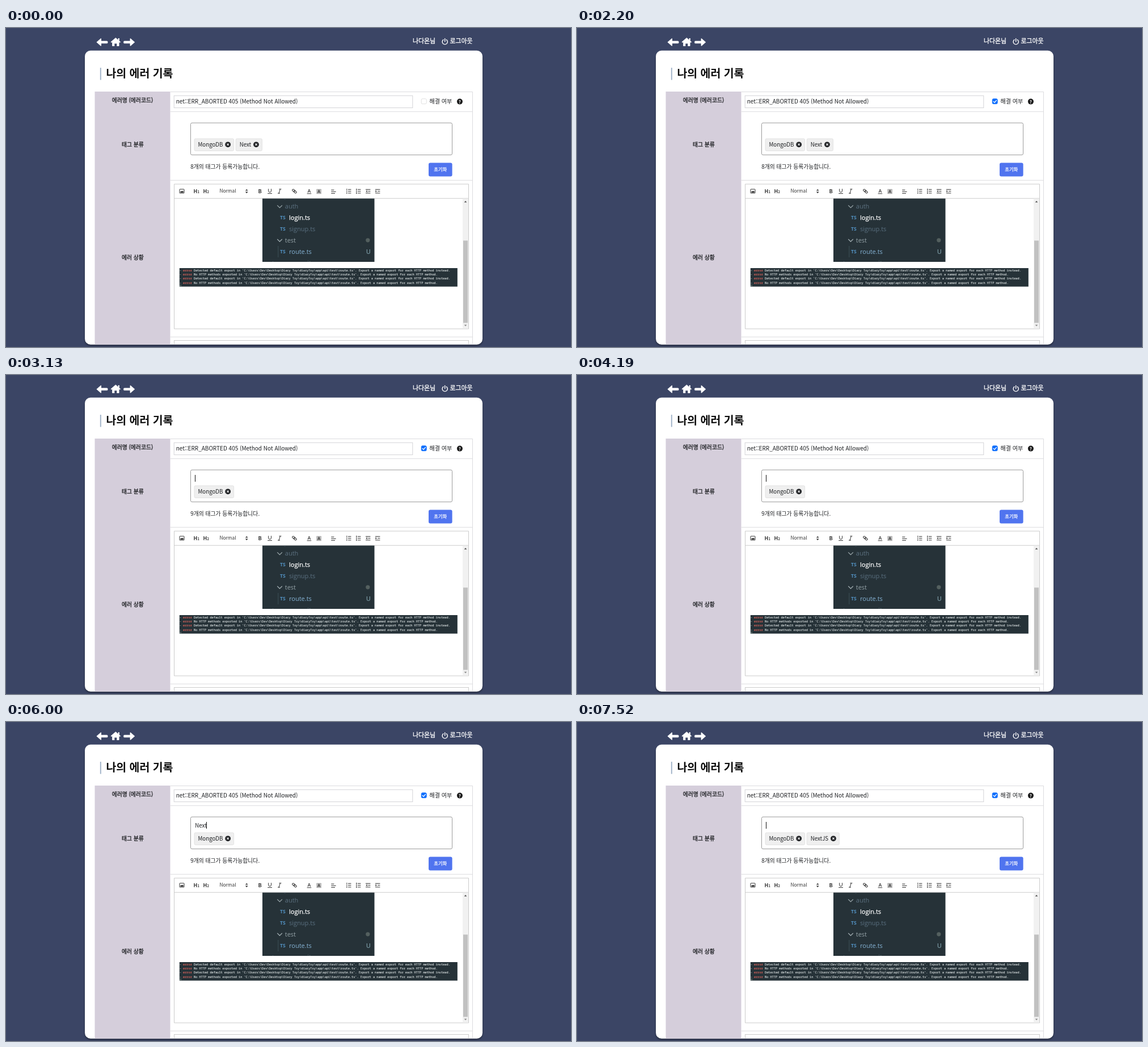
Recreate the animation shown at these times as an HTML page. Size 996 by 562 pixels, loop 8000 ms.

```html
<!DOCTYPE html>
<html lang="ko">
<head>
<meta charset="utf-8">
<title>나의 에러 기록</title>
<style>
  html, body { margin: 0; width: 100%; height: 100%; overflow: hidden; background: #3b4565; }
  svg { display: block; width: 996px; height: 562px; }
  text { font-family: "Noto Sans CJK KR", "Noto Sans CJK", "Noto Sans CJK JP", "Noto Sans", sans-serif; font-size: 9.8px; fill: #1c1e21; white-space: pre; }
  .mid { stroke: #1c1e21; stroke-width: .3; text-anchor: middle; }
  .head { font-size: 10.9px; fill: #fff; stroke: #fff; stroke-width: .3; }
  .title { font-size: 19.4px; font-weight: 700; fill: #0c0c0c; }
  .tree text { font-family: "Open Sans", "Noto Sans", sans-serif; font-size: 11px; }
  .tree .ts { font-size: 8.6px; font-weight: 700; fill: #5290c0; }
  .log text { font-family: "Noto Sans Mono", monospace; font-size: 5.27px; fill: #dfe5e5; stroke: #dfe5e5; stroke-width: .1; }
  .log .err { fill: #ef6a60; stroke: #ef6a60; }
  .icons { fill: none; stroke: #333; stroke-width: 1; }
  .icons text { stroke: none; fill: #333; }
  .line { fill: none; stroke: #dcdcdf; }
</style>
</head>
<body>
<svg viewBox="0 0 996 562" xmlns="http://www.w3.org/2000/svg">
  <defs>
    <filter id="soft" x="-5%" y="-5%" width="110%" height="110%"><feGaussianBlur stdDeviation="1.5"/></filter>
    <clipPath id="panel"><rect x="139" y="40" width="701" height="517.5"/></clipPath>
    <clipPath id="shot"><rect x="452" y="300.5" width="197.5" height="111.5"/></clipPath>
  </defs>
  <rect width="996" height="562" fill="#3b4565"/>

  <!-- header -->
  <g fill="#fff">
    <path id="arrow" d="M159.4 25 l7.4 -6.4 q1.2 -.8 1.2 .8 v3.3 h9.8 q1.6 0 1.6 1.6 v1.4 q0 1.6 -1.6 1.6 h-9.8 v3.3 q0 1.6 -1.2 .8z"/>
    <path d="M227.2 25 l-7.4 -6.4 q-1.2 -.8 -1.2 .8 v3.3 h-9.8 q-1.6 0 -1.6 1.6 v1.4 q0 1.6 1.6 1.6 h9.8 v3.3 q0 1.6 1.2 .8z"/>
    <path d="M193.3 17 L202 24.6 L200.8 26 L199.5 25 V31.2 q0 .8 -.8 .8 H195.3 V27.4 H191.3 V32 H187.9 q-.8 0 -.8 -.8 V25 L185.8 26 L184.6 24.6z"/>
    <rect x="197.6" y="18" width="2.2" height="4.5"/>
  </g>
  <text class="head" x="717" y="26.8">나다온님</text>
  <path d="M771 20.6 A4.6 4.6 0 1 0 776.4 20.6 M773.7 18.6 V24" fill="none" stroke="#fff" stroke-width="1.4" stroke-linecap="round"/>
  <text class="head" x="782.5" y="26.8">로그아웃</text>

  <!-- panel -->
  <rect x="139" y="43" width="701" height="517" rx="10" fill="#000" opacity=".35" filter="url(#soft)"/>
  <rect x="139" y="39.7" width="701" height="518" rx="10" fill="#fff"/>
  <rect x="165.8" y="70" width="2" height="21.5" fill="#a3b6ca"/>
  <text class="title" x="176.5" y="86.6">나의 에러 기록</text>

  <g clip-path="url(#panel)">
    <rect x="156.5" y="112" width="133" height="450" fill="#d5cedb"/>
    <path class="line" d="M289.5 112.5 H822.5 V562 M289.5 147.3 H822.5 M289.5 268.3 H822.5 M289.5 544.3 H822.5"/>
    <rect class="line" x="296.5" y="550.5" width="519" height="40" style="stroke:#ccc"/>
  </g>
  <text class="mid" x="223" y="130.8">에러명 (에러코드)</text>
  <text class="mid" x="223.3" y="209">태그 분류</text>
  <text class="mid" x="223.3" y="407.8">에러 상황</text>

  <!-- name row -->
  <rect class="line" x="296.2" y="119.2" width="420.6" height="21.4" style="stroke:#d3d3d8"/>
  <text x="299.7" y="132.8" style="font-size:10px">net::ERR_ABORTED 405 (Method Not Allowed)</text>
  <rect id="ring" x="729.8" y="122.4" width="13.6" height="13.6" rx="3.4" fill="#c2dbfe"/>
  <rect id="box" x="732.2" y="124.7" width="9" height="9" rx="2"/>
  <path id="tick" d="M734.2 129.4 l1.9 1.8 l3.4 -3.8" fill="none" stroke="#fff" stroke-width="1.4" stroke-linecap="round" stroke-linejoin="round"/>
  <text x="746.5" y="132.6" style="font-size:10px">해결 여부</text>
  <circle cx="799.9" cy="129.6" r="5" fill="#1b1b1b"/>
  <text x="799.9" y="132.5" text-anchor="middle" style="font-size:8px;font-weight:700;fill:#fff">?</text>

  <!-- tag row -->
  <rect x="325.5" y="167.2" width="461" height="56.4" rx="2.5" fill="#fff" stroke="#9b9b9b"/>
  <text id="query" x="333.3" y="185.6" style="font-size:9.7px"></text>
  <rect id="caret" y="176" width="1" height="12" fill="#111"/>
  <g id="tags"></g>
  <text id="left" x="325.3" y="247.8"></text>
  <rect x="745" y="237.4" width="41.6" height="24" rx="3" fill="#5074ef"/>
  <text x="765.8" y="251.7" text-anchor="middle" style="font-size:8.3px;fill:#fff;stroke:#fff;stroke-width:.25">초기화</text>

  <!-- editor -->
  <path d="M296.5 275 V530 H815.5 V275 Z M296.5 300.2 H815.5" fill="none" stroke="#cbcbcb"/>
  <g class="icons">
    <rect x="306" y="284" width="8" height="7" rx=".6"/>
    <path d="M307.4 290 V288.6 L309 287 L310.2 288 L311.6 286.6 L312.8 288.4 V290z" fill="#333" stroke="none"/>
    <text x="330.4" y="290.8" style="font-size:9px;font-weight:700">H</text><text x="337.6" y="290.8" style="font-size:5.8px;font-weight:700">1</text>
    <text x="347.4" y="290.8" style="font-size:9px;font-weight:700">H</text><text x="354.5" y="290.8" style="font-size:5.8px;font-weight:700">2</text>
    <text x="376.6" y="290.2" style="font-size:8.3px">Normal</text>
    <path d="M421.8 286.6 L424.2 284 L426.6 286.6z M421.8 288.6 L424.2 291.2 L426.6 288.6z" fill="#333" stroke="none"/>
    <text x="444.6" y="291" style="font-size:9.2px;font-weight:700">B</text>
    <path d="M462.7 283.4 V287 a2.4 2.4 0 0 0 4.8 0 V283.4 M461.2 291.6 H469 M481.4 283.9 H485.4 M479 291.2 H483 M483.4 283.9 L481 291.2"/>
    <g transform="rotate(42 508.4 287.5)"><rect x="504" y="285.9" width="5.2" height="3.2" rx="1.6"/><rect x="507.6" y="285.9" width="5.2" height="3.2" rx="1.6"/></g>
    <path d="M532 290 L534.4 284 L536.8 290 M533 288.2 H535.8 M530.6 291.8 H538.2"/>
    <rect x="547.6" y="284" width="8" height="8" fill="#bbb" stroke="#888" stroke-width=".7" stroke-dasharray="1 1"/>
    <path d="M549.6 290.6 L551.6 285.2 L553.6 290.6 M550.4 289 H552.8"/>
    <path d="M573.2 285.4 H578.4 M573.2 288.4 H581.6 M573.2 291.4 H580"/>
    <g id="lists"></g>
  </g>

  <g class="tree" clip-path="url(#shot)">
    <rect x="452" y="300" width="198" height="112" fill="#263238"/>
    <path d="M490 300.8 h3 M470 411.5 l3 2" stroke="#5f7380"/>
    <path d="M478.2 312.4 l4.3 4.3 l4.3 -4.3 M478.2 372 l4.3 4.3 l4.3 -4.3" fill="none" stroke="#9aa6aa" stroke-width="1.3"/>
    <path d="M479.8 384 V404" stroke="#3e4f58"/>
    <text x="491.8" y="318.2" style="fill:#5c7180">auth</text>
    <text class="ts" x="483" y="337.4">TS</text><text x="499" y="338.2" style="fill:#fff;stroke:#fff;stroke-width:.25">login.ts</text>
    <text class="ts" x="483" y="357.2">TS</text><text x="499" y="358.1" style="fill:#5a7080">signup.ts</text>
    <text x="491.8" y="378" style="fill:#93a1a6">test</text>
    <text class="ts" x="483" y="397">TS</text><text x="499" y="397.8" style="fill:#86b4d6">route.ts</text>
    <text x="485.5" y="417.6" style="fill:#6d7f88">community</text>
    <circle cx="637.8" cy="373.8" r="3.6" fill="#54605f"/>
    <text x="634.8" y="397.8" style="fill:#74929c;font-weight:600">U</text>
  </g>

  <g class="log" id="log"><rect x="305.8" y="423" width="490" height="32.6" fill="#263238"/></g>

  <rect x="805" y="300.7" width="10" height="228.8" fill="#f1f1f1"/>
  <rect x="806" y="374.5" width="8" height="145" fill="#c1c1c1"/>
  <path d="M807.7 307.2 L810 304.6 L812.3 307.2z" fill="#505050"/>
  <path d="M807.7 522.8 L810 525.4 L812.3 522.8z" fill="#8a8a8a"/>
</svg>
<script>
const LOOP = 8000, BLINK = 530;
const EDITS = [[3130, ""], [4850, "N"], [5530, "Ne"], [5730, "Nex"], [6000, "Next"], [6330, "NextJ"], [6460, "NextJS"], [7520, ""]];
const $ = id => document.getElementById(id);

function add(parent, name, attrs, text = "") {
  const el = document.createElementNS("http://www.w3.org/2000/svg", name);
  for (const key in attrs) el.setAttribute(key, attrs[key]);
  el.textContent = text;
  return parent.appendChild(el);
}

function set(el, attrs) {
  for (const key in attrs) el.setAttribute(key, attrs[key]);
}

function buildLists() {
  [600, 617, 634, 651].forEach((x, kind) => {
    const inset = kind > 1 ? 3.6 : 3;
    const middle = kind > 1 ? 4.2 : inset;
    const top = kind > 1 ? 0 : inset;
    add($("lists"), "path", { d: `M${x + top} 284.4 H${x + 8.4} M${x + middle} 287.5 H${x + 8.4} M${x + top} 290.8 H${x + 8.4}` });
    if (kind < 2) {
      add($("lists"), "path", { d: `M${x + .8} 283.2 v2.4 m0 .8 v2.2 m0 1 v2.4`, "stroke-width": kind ? 1.4 : 1.1 });
    } else {
      const d = kind === 2 ? `M${x + 2.8} 285.8 l-2.4 1.8 l2.4 1.8z` : `M${x + .4} 285.8 l2.4 1.8 l-2.4 1.8z`;
      add($("lists"), "path", { d, fill: "#333", stroke: "none" });
    }
  });
}

function buildLog() {
  const path = String.raw`'C:\Users\Dev\Desktop\Diary Toy\diaryToy\app\api\test\route.ts'. `;
  const lines = [
    "Detected default export in " + path + "Export a named export for each HTTP method instead.",
    "No HTTP methods exported in " + path + "Export a named export for each HTTP method."
  ];
  for (let i = 0; i < 4; i++) {
    const y = 429 + i * 7.2;
    add($("log"), "text", { x: 305.8, y }, "-");
    add($("log"), "text", { x: 312, y, class: "err" }, "error");
    add($("log"), "text", { x: 331, y }, lines[i % 2]);
  }
  add($("log"), "path", { d: "M306.6 452.6 h1.8 v2.4 h-1.8z", fill: "none", stroke: "#8fa39a", "stroke-width": .5 });
}

function drawTags(names) {
  const group = $("tags");
  if (group.dataset.names === names.join()) return;
  group.dataset.names = names.join();
  group.replaceChildren();
  let x = 332;
  for (const name of names) {
    const box = add(group, "rect", { x, y: 195, width: 1, height: 21.4, rx: 2, fill: "#efefef", stroke: "#dedede", "stroke-width": .8 });
    const label = add(group, "text", { x: x + 6.5, y: 209, style: "font-size:9.7px" }, name);
    const cx = x + 15.3 + label.getComputedTextLength();
    add(group, "circle", { cx, cy: 205.3, r: 4.9, fill: "#242629" });
    add(group, "path", { d: `M${cx - 1.6} 203.7 l3.2 3.2 m0 -3.2 l-3.2 3.2`, stroke: "#fff", "stroke-width": 1.1 });
    box.setAttribute("width", cx + 10.4 - x);
    x = cx + 14;
  }
}

function render(t) {
  const checked = t >= 1260;
  const focused = t >= 1190 && t < 2200;
  const pressed = focused && !checked;
  set($("ring"), { visibility: focused ? "visible" : "hidden" });
  set($("box"), {
    fill: checked ? "#0d6efd" : pressed ? "#e6e6e6" : "#fff",
    stroke: checked ? "#0d6efd" : pressed ? "#79a5e5" : "#d9d9d9",
    "stroke-width": .8
  });
  set($("tick"), { visibility: checked ? "visible" : "hidden" });

  const tags = ["MongoDB"];
  if (t < 2330) tags.push("Next");
  if (t >= 7520) tags.push("NextJS");
  drawTags(tags);
  $("left").textContent = `${10 - tags.length}개의 태그가 등록가능합니다.`;

  const edit = EDITS.filter(([start]) => start <= t).pop();
  const query = edit ? edit[1] : "";
  $("query").textContent = query;
  const caretOn = edit && Math.floor((t - edit[0]) / BLINK) % 2 === 0;
  const offset = query ? $("query").getComputedTextLength() : 0;
  set($("caret"), { x: Math.floor(333.3 + offset), visibility: caretOn ? "visible" : "hidden" });
}

buildLists();
buildLog();
const started = performance.now();
function tick() {
  render((performance.now() - started) % LOOP);
  requestAnimationFrame(tick);
}
tick();
</script>
</body>
</html>
```
